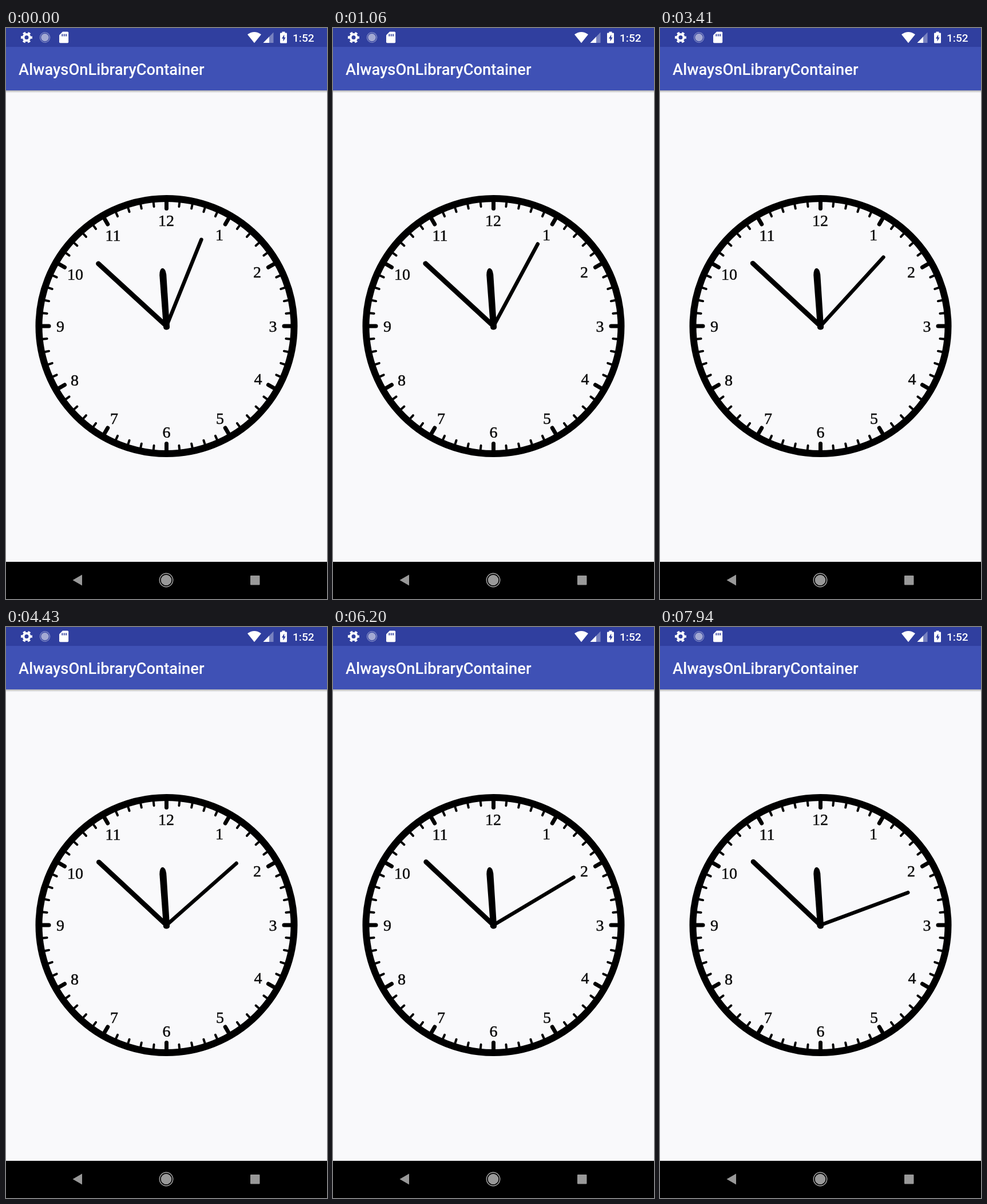
Recreate the animation shown at these times as an HTML page. Size 561 by 998 pixels, loop 7990 ms.

```html
<!DOCTYPE html>
<html lang="en">
<head>
<meta charset="utf-8">
<title>Clock</title>
<style>
  html, body { margin: 0; width: 100%; height: 100%; overflow: hidden; background: #f9f9fb; }
  svg { display: block; width: 100%; height: 100%; }
  text { font-family: Roboto, sans-serif; font-weight: 500; fill: #fff; }
  #numerals text {
    font: 28px "Liberation Serif", serif; text-anchor: middle;
    fill: #0a0a0a; stroke: #0a0a0a; stroke-width: .5;
  }
  #ticks, #hands { stroke: #000; stroke-linecap: round; }
</style>
</head>
<body>
<svg viewBox="0 0 561 998">
  <defs>
    <linearGradient id="shadow" x2="0" y2="1">
      <stop stop-color="#000" stop-opacity=".32"/>
      <stop offset="1" stop-color="#000" stop-opacity="0"/>
    </linearGradient>
  </defs>
  <rect width="561" height="998" fill="#f9f9fb"/>
  <rect y="108.5" width="561" height="5" fill="url(#shadow)"/>
  <rect width="561" height="109" fill="#3f51b5"/>
  <rect width="561" height="33" fill="#303f9f"/>
  <text x="22" y="81.5" font-size="27.3">AlwaysOnLibraryContainer</text>
  <text x="501" y="24" font-size="19.1">1:52</text>

  <!-- Status icons -->
  <g fill="#fff">
    <g transform="translate(36 16.5)" fill="none" stroke="#fff">
      <circle r="5.5" stroke-width="4"/>
      <circle r="8.3" stroke-width="3.4" stroke-dasharray="4.4 4.291" stroke-dashoffset="2.2"/>
    </g>
    <circle cx="68" cy="16.5" r="6.8" fill="#a3a9d3"/>
    <circle cx="68" cy="16.5" r="8.5" fill="none" stroke="#b5bade" stroke-width="1.5" stroke-dasharray="1.2 1"/>
    <path d="M99 6.5h8.5q1.7 0 1.7 1.7v16.3q0 1.7-1.7 1.7H94.700q-1.700 0-1.700-1.700V12.500z"/>
    <path d="M98.300 10.500v4M101.700 10.500v4M105.100 10.500v4" stroke="#303f9f" stroke-width="1.800"/>
    <path d="M422 11.300Q434 2.500 446 11.300L434 26.200z"/>
    <path d="M467.500 7.500V26H449.500z" fill-opacity=".35"/>
    <path d="M460 15.200V26H449.500z"/>
    <path d="M482.500 8.500V6.500h5v2h2.200q1.300 0 1.300 1.300v15.400q0 1.300-1.300 1.300h-9.400q-1.300 0-1.300-1.300V9.800q0-1.300 1.300-1.300z"/>
    <path d="M486.200 11.500l-4.200 7h2.500v5l4.200-7h-2.500z" fill="#303f9f"/>
  </g>

  <g transform="translate(280.500 521)">
    <circle r="223" fill="none" stroke="#000" stroke-width="12"/>
    <g id="ticks"></g>
    <g id="numerals"></g>
    <g id="hands">
      <path id="hour" stroke="none" d="M-5.500 2L-6-90Q-5-101 0-101.500Q5-101 6-90L5.500 2Q5 6.500 0 6.500Q-5 6.500-5.500 2z"/>
      <path id="minute" d="M0 1V-161.500" stroke-width="8.600"/>
      <path id="second" d="M0 3V-163" stroke-width="6.500"/>
    </g>
  </g>

  <!-- Navigation bar -->
  <rect y="933" width="561" height="65"/>
  <g fill="#999">
    <path d="M116.500 965L133 955.500V974.500z"/>
    <circle cx="280" cy="965" r="9.300"/>
    <circle cx="280" cy="965" r="11.700" fill="none" stroke="#aaa" stroke-width="1.400"/>
    <rect x="427" y="957" width="16.500" height="16.500" rx="1"/>
  </g>
</svg>
<script>
const LOOP = 7990;
const byId = id => document.getElementById(id);

function add(parent, tag, attrs) {
  const node = document.createElementNS("http://www.w3.org/2000/svg", tag);
  for (const key in attrs) node.setAttribute(key, attrs[key]);
  return byId(parent).appendChild(node);
}

for (let i = 0; i < 60; i++) {
  const major = i % 5 === 0;
  add("ticks", "path", {
    d: `M0-218V${major ? -205.5 : -210}`,
    "stroke-width": major ? 7 : 4,
    transform: `rotate(${i * 6})`
  });
}

// Numeral centres, relative to the dial centre, from 1 to 12
[[92.5, -160], [158.5, -95], [186, 0], [160, 92], [93.5, 161], [0, 185],
 [-91.5, 161], [-160.5, 94], [-185.5, 0], [-159.5, -91], [-93.5, -159], [-.5, -185]]
  .forEach(([x, y], i) => add("numerals", "text", { x, y: y + 9.5 }).textContent = i + 1);

const turn = (id, degrees) => byId(id).setAttribute("transform", `rotate(${degrees})`);

function draw(now) {
  const seconds = (now % LOOP) / 1000;
  turn("second", 21.95 + seconds * 6);
  turn("minute", -47.5 + seconds * .1);
  turn("hour", -4 + seconds / 120);
  requestAnimationFrame(draw);
}
draw(performance.now());
</script>
</body>
</html>
```
